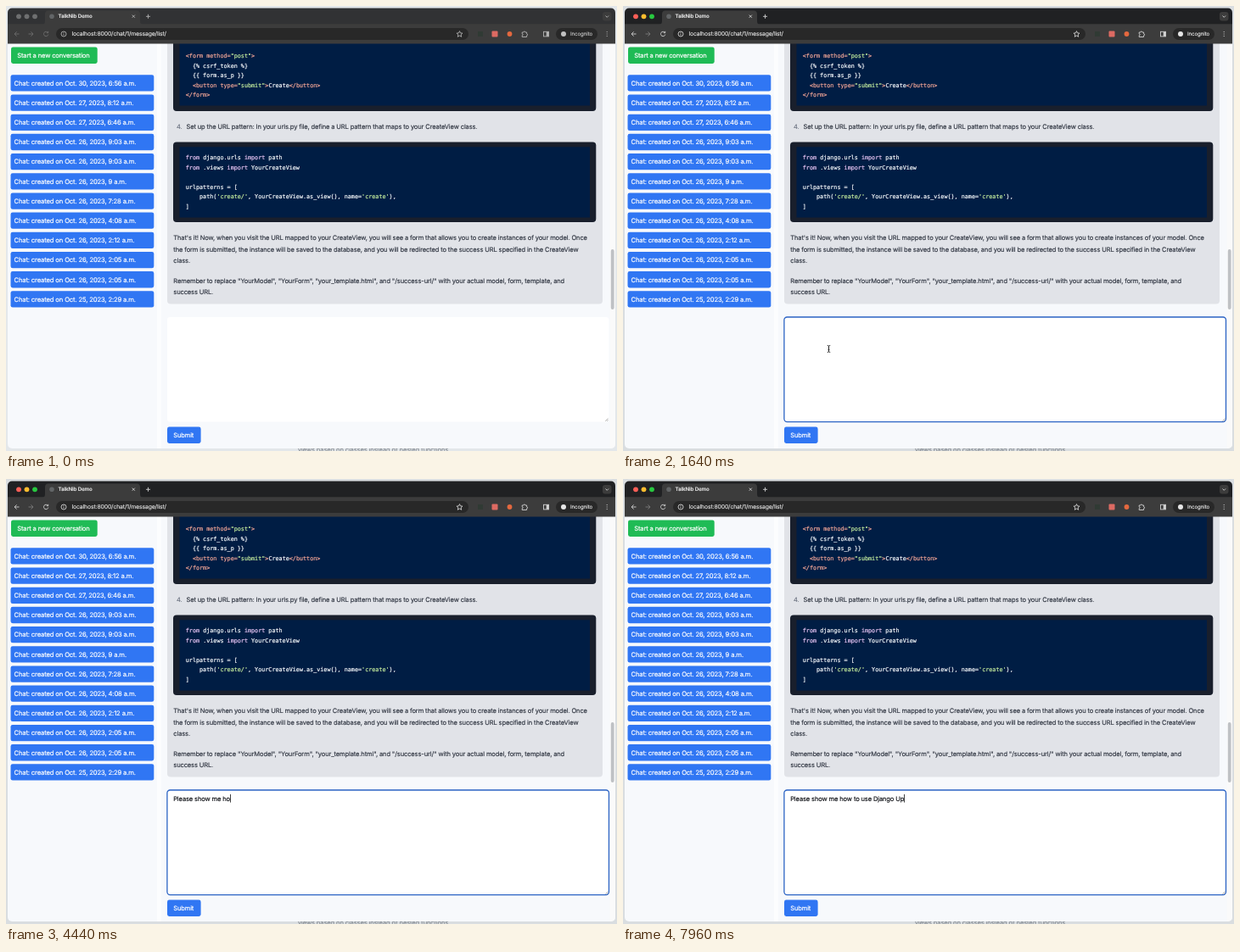
Recreate the animation shown at these times as an HTML page. Size 720 by 525 pixels, loop 8000 ms.

```html
<!DOCTYPE html>
<html lang="en">
<head>
<meta charset="utf-8">
<title>Chat demo</title>
<style>
html, body { margin: 0; width: 100%; height: 100%; overflow: hidden; }
svg { display: block; width: 720px; height: 525px; }
text { font: 7.56px Inter, sans-serif; letter-spacing: -.018em; white-space: pre; text-rendering: geometricPrecision; }
text, tspan { fill: var(--ink); stroke: var(--ink); stroke-width: .14; }
.prose { --ink: #2d333f; }
.code { font: 6.75px "DejaVu Sans Mono", monospace; letter-spacing: 0; --ink: #f6f8fb; }
.tag { --ink: #f2a596; }
.str { --ink: #c4ec9e; }
.key { --ink: #e6c3f2; }
.label { --ink: #fff; }
.code, .label, .code tspan { stroke-width: .2; }
.small { font-size: 6.2px; --ink: #e6e6e6; }
.title { font-weight: 600; }
.line { fill: none; stroke: #d2d2d2; stroke-width: .9; }
.nav { stroke: #7b7b7b; }
.strip { fill: #313234; }
.lamp { fill: #6e6f70; }
.focused .strip { fill: #202123; }
.focused .desk { fill: #d9dde0; }
.focused #red { fill: #ff5f57; }
.focused #amber { fill: #febc2e; }
.focused #green { fill: #28c840; }
.focused .back { stroke: #d2d2d2; }
#bar { opacity: .8; }
.focused #bar { opacity: 1; }
.box { fill: #fff; }
.focused .box { stroke: #2b63c4; stroke-width: 1.3; }
</style>
</head>
<body>
<svg id="stage" viewBox="0 0 720 525">
  <defs>
    <clipPath id="window"><rect x="2" y="2.5" width="716" height="519.5" rx="5"/></clipPath>
    <clipPath id="below"><rect y="522" width="720" height="3"/></clipPath>
  </defs>
  <rect class="desk" width="720" height="525" fill="#e3e7ea"/>
  <text x="344" y="526" style="--ink:#858b92" clip-path="url(#below)">views based on classes instead of nested functions</text>

  <g clip-path="url(#window)">
    <rect width="720" height="525" fill="#f7f9fc"/>
    <rect x="178" y="44" width="5" height="481" fill="#fcfdfe"/>
    <rect x="711.5" y="44" width="7" height="481" fill="#fafafa"/>
    <rect x="712.8" y="287" width="3.8" height="71" rx="1.9" fill="#bfc1c4"/>

    <rect x="6" y="48.5" width="101.7" height="19.4" rx="2.3" fill="#1fbb55"/>
    <text class="label" x="13.3" y="61">Start a new conversation</text>
    <g id="chats"></g>

    <rect x="190" y="30" width="513" height="321.5" rx="4" fill="#e1e3e8"/>
    <rect x="197" y="30" width="498.3" height="94" rx="4" fill="#191f2c"/>
    <rect x="204.5" y="30" width="483.5" height="87.5" fill="#001d44"/>
    <g class="block" data-y="61">
      <text class="code"><tspan class="tag">&lt;form method=<tspan class="str">"post"</tspan>&gt;</tspan></text>
      <text class="code">  {% csrf_token %}</text>
      <text class="code">  {{ form.as_p }}</text>
      <text class="code">  <tspan class="tag">&lt;button type=<tspan class="str">"submit"</tspan>&gt;</tspan>Create<tspan class="tag">&lt;/button&gt;</tspan></text>
      <text class="code"><tspan class="tag">&lt;/form&gt;</tspan></text>
    </g>
    <text x="201" y="145" style="--ink:#6b7280">4.</text>
    <text class="prose" x="212.5" y="145">Set up the URL pattern: In your urls.py file, define a URL pattern that maps to your CreateView class.</text>
    <rect x="197" y="160.5" width="498.3" height="94.5" rx="4" fill="#191f2c"/>
    <rect x="204.5" y="166.3" width="483.5" height="83.2" fill="#001d44"/>
    <g class="block" data-y="181">
      <text class="code"><tspan class="key">from</tspan> django.urls <tspan class="key">import</tspan> path</text>
      <text class="code"><tspan class="key">from</tspan> .views <tspan class="key">import</tspan> YourCreateView</text>
      <text class="code"></text>
      <text class="code">urlpatterns = [</text>
      <text class="code">    path(<tspan class="str">'create/'</tspan>, YourCreateView.as_view(), name=<tspan class="str">'create'</tspan>),</text>
      <text class="code">]</text>
    </g>
    <g class="prose">
      <text x="197.3" y="276.4">That's it! Now, when you visit the URL mapped to your CreateView, you will see a form that allows you to create instances of your model. Once</text>
      <text x="197.3" y="289.8">the form is submitted, the instance will be saved to the database, and you will be redirected to the success URL specified in the CreateView</text>
      <text x="197.3" y="303.4">class.</text>
      <text x="197.3" y="326.6">Remember to replace "YourModel", "YourForm", "your_template.html", and "/success-url/" with your actual model, form, template, and</text>
      <text x="197.3" y="340">success URL.</text>
    </g>

    <rect class="box" x="189.9" y="367" width="520.6" height="123.6" rx="3.5"/>
    <path d="M706.3 489.8l3.2-3.2M708.2 489.8l1.3-1.3" stroke="#777" stroke-width=".6"/>
    <text id="typed" x="197.2" y="379.5" style="--ink:#0b0d12"></text>
    <rect id="caret" y="372" width=".8" height="9.6" fill="#111"/>
    <rect x="190" y="496.6" width="39.6" height="19.3" rx="2.3" fill="#3076f3"/>
    <text class="label" x="197.2" y="509">Submit</text>

    <rect class="strip" width="720" height="22"/>
    <path d="M42 22q4 0 4-4V9.5q0-4 4-4h104q4 0 4 4V18q0 4 4 4z" fill="#3c3c3c"/>
    <rect y="21.3" width="720" height="23.2" fill="#3c3c3c"/>
    <circle class="lamp" id="red" cx="15" cy="12.3" r="2.9"/>
    <circle class="lamp" id="amber" cx="24.5" cy="12.3" r="2.9"/>
    <circle class="lamp" id="green" cx="34" cy="12.3" r="2.9"/>
    <rect x="59" y="26" width="486" height="14" rx="7" fill="#282828"/>
    <rect x="648" y="26" width="49" height="14" rx="7" fill="#282828"/>
    <rect x="703" y="7" width="10.5" height="10.5" rx="3" fill="#3c3c3c"/>
    <circle cx="54" cy="12.2" r="2.8" fill="#626567"/>
    <text class="small title" x="61.5" y="14.4">TalkNib Demo</text>
    <text class="small" x="77.5" y="35.3" style="font-size:6.83px">localhost:8000/chat/1/message/list/</text>
    <g id="bar">
      <path class="line" d="M148.7 10.6l3.2 3.2m0-3.2l-3.2 3.2M165 12.3h5m-2.5-2.5v5M706.5 11.5l1.8 1.8 1.8-1.8"/>
      <path class="line nav back" d="M15.5 33h-5.5m2.6-2.6L10 33l2.6 2.6"/>
      <path class="line nav" d="M26.5 33h5.5m-2.6-2.6L32 33l-2.6 2.6"/>
      <path class="line nav back" d="M49.3 31.3A2.7 2.7 0 1 0 49.8 33.6M49.7 29.8v1.9h-1.9"/>
      <circle class="line" cx="68" cy="33" r="3"/>
      <path class="line" d="M68 32.5v2m0-3.6v.8"/>
      <path class="line" d="M534.5 29.6l1 2.3 2.5.2-1.9 1.7.6 2.5-2.2-1.3-2.2 1.3.6-2.5-1.9-1.7 2.5-.2z"/>
      <path class="line" d="M608.2 31h1.7a1 1 0 0 1 2 0h1.7v1.8a1 1 0 0 1 0 2v1.7h-5.4v-1.7a1 1 0 0 0 0-2z"/>
      <rect class="line" x="633.5" y="30.3" width="6" height="5.6"/>
      <rect x="636.7" y="30.3" width="2.8" height="5.6" fill="#d2d2d2"/>
      <circle cx="657" cy="33" r="3" fill="#e6e6e6"/>
      <text class="small" x="665" y="35.2">Incognito</text>
      <path d="M707.7 30h1v1h-1zm0 2.5h1v1h-1zm0 2.5h1v1h-1z" fill="#d2d2d2"/>
    </g>
    <rect x="556" y="30" width="6" height="6" fill="#303a34"/>
    <rect x="572.5" y="29.5" width="7" height="7" rx="1" fill="#dd6a62"/>
    <circle cx="593.5" cy="33" r="2.9" fill="#e4683f"/>
  </g>

  <path id="arrow" d="M0 0V7.3L1.7 5.8L2.8 8.3L4 7.8L2.9 5.3H5.1Z" fill="#000" stroke="#fff" stroke-width=".5"/>
  <path id="beam" d="M-1.7-4q1.7 0 1.7 1V3q0 1-1.7 1M1.7-4q-1.7 0-1.7 1V3q0 1 1.7 1M-.9 1h1.8" fill="none" stroke="#222" stroke-width=".9"/>
</svg>
<script>
const LOOP = 8000, FOCUS = 880, BEAM = 960;
const MESSAGE = 'Please show me how to use Django Up';
// When each character of MESSAGE is typed, in ms
const KEYS = [
  2480, 2600, 2680, 2720, 2800, 2880, 3000,
  3600, 3680, 3760, 3840, 3920, 4000, 4080, 4160,
  4320, 4400, 4480, 4560, 4720, 4800, 5000,
  5200, 5280, 5400, 5600,
  6600, 6680, 6760, 6920, 7120, 7240, 7400, 7800, 7960
];
const CHATS = [
  '30, 2023, 6:56', '27, 2023, 8:12', '27, 2023, 6:46', '26, 2023, 9:03',
  '26, 2023, 9:03', '26, 2023, 9', '26, 2023, 7:28', '26, 2023, 4:08',
  '26, 2023, 2:12', '26, 2023, 2:05', '26, 2023, 2:05', '25, 2023, 2:29'
];
const $ = id => document.getElementById(id);
const [stage, typed, caret, arrow, beam] = ['stage', 'typed', 'caret', 'arrow', 'beam'].map($);

$('chats').innerHTML = CHATS.map((when, i) => {
  const y = 81.3 + i * 23.18;
  return `<rect x="5.5" y="${y}" width="168.8" height="19.3" rx="2.3" fill="#3076f3"/>
    <text class="label" x="9.5" y="${y + 12.4}" style="font-size:7.64px">Chat: created on Oct. ${when} a.m.</text>`;
}).join('');

for (const block of document.querySelectorAll('.block')) {
  [...block.children].forEach((line, i) => {
    line.setAttribute('x', 211.8);
    line.setAttribute('y', +block.dataset.y + i * 11.6);
  });
}

const show = (el, on) => el.setAttribute('visibility', on ? 'visible' : 'hidden');
const place = (el, x, y) => el.setAttribute('transform', `translate(${x} ${y})`);
const progress = (t, from, to) => Math.min(1, Math.max(0, (t - from) / (to - from)));
const ease = u => u * u * (3 - 2 * u);
const curve = (u, a, b, c) => (1 - u) ** 2 * a + 2 * u * (1 - u) * b + u * u * c;

function draw(t) {
  const focused = t >= FOCUS;
  stage.classList.toggle('focused', focused);

  const sweep = ease(progress(t, 40, 840));
  place(arrow, curve(sweep, 442, 420, 240.3), curve(sweep, 57, 545, 409));
  show(arrow, t >= 40 && t < BEAM);

  const drift = ease(progress(t, BEAM, 1560));
  place(beam, 240.5 + 2 * drift, 410 - 5.5 * drift);
  show(beam, t >= BEAM && t < KEYS[0]);

  const count = KEYS.filter(k => k <= t).length;
  const text = MESSAGE.slice(0, count);
  if (typed.textContent !== text) typed.textContent = text;
  const lastKey = count ? KEYS[count - 1] : FOCUS;
  caret.setAttribute('x', 197.2 + (count ? typed.getComputedTextLength() : 0));
  show(caret, focused && (t - lastKey) % 1000 < 500);
}

function tick() {
  draw(performance.now() % LOOP);
  requestAnimationFrame(tick);
}
tick();
</script>
</body>
</html>
```
